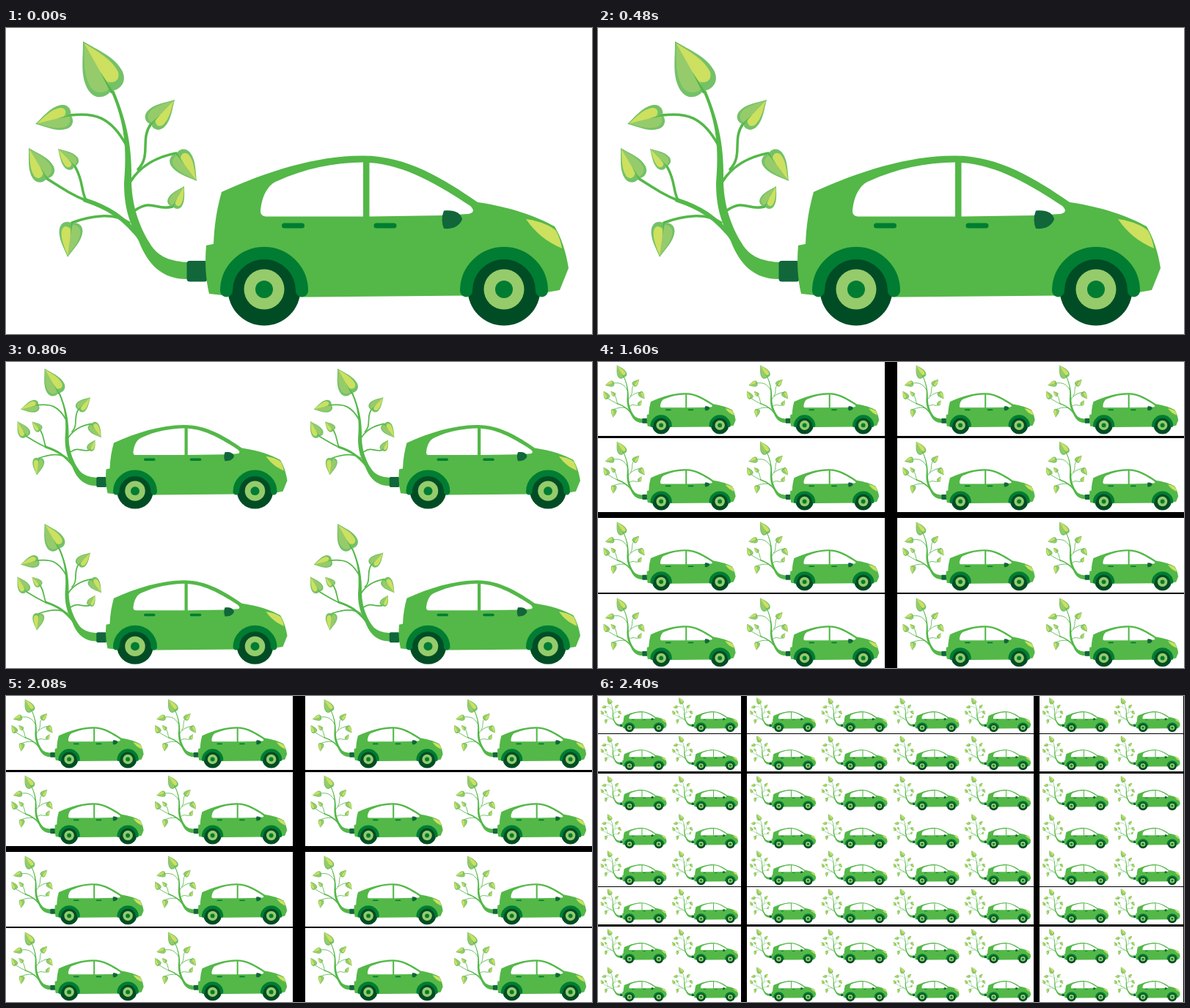
Recreate the animation shown at these times as an HTML page with a canvas. Size 799 px wide and 418 px high, loop 3200 ms.

```html
<!DOCTYPE html>
<html>
<head>
<meta charset="utf-8">
<style>
html, body { margin: 0; width: 100%; height: 100%; overflow: hidden; background: #fff; }
canvas { display: block; }
</style>
</head>
<body>
<canvas id="stage" width="799" height="418"></canvas>
<script>
const W = 799, H = 418, HOLD = 800;
const GREEN = '#53b848', MID = '#007d32', DARK = '#004d25', LIGHT = '#95cb6b', LIME = '#cde05f', PLUG = '#11673a', RIM = '#74c168';
const ctx = document.getElementById('stage').getContext('2d');

const fill = (color, path) => { ctx.fillStyle = color; ctx.fill(new Path2D(path)); };
const disc = (color, x, y, r) => { ctx.fillStyle = color; ctx.beginPath(); ctx.arc(x, y, r, 0, 7); ctx.fill(); };
const pill = (color, x, y, w, h, r) => { ctx.fillStyle = color; ctx.beginPath(); ctx.roundRect(x, y, w, h, r); ctx.fill(); };
const line = (color, width, path) => {
  ctx.strokeStyle = color;
  ctx.lineWidth = width;
  ctx.lineCap = 'round';
  ctx.stroke(new Path2D(path));
};

// A unit leaf laid from its tip to its base; side picks the lime half.
function leaf(tipX, tipY, baseX, baseY, side) {
  const dx = baseX - tipX, dy = baseY - tipY, k = .86 * side;
  ctx.save();
  ctx.transform(dx, dy, -dy * k, dx * k, tipX, tipY);
  fill(RIM, 'M0 0C.28 .18 .5 .4 .78 .39C1 .37 1.05 .14 .98 0C1.05 -.14 1 -.37 .78 -.39C.5 -.4 .28 -.18 0 0');
  fill(LIGHT, 'M.04 0C.3 -.16 .5 -.33 .76 -.32C.93 -.29 .97 -.1 .93 0L.8 .06Z');
  fill(LIME, 'M.04 0C.3 .16 .5 .32 .75 .31C.92 .27 .91 .08 .77 0Z');
  fill(GREEN, 'M.6 0L1.02 -.03L1.02 .03Z');
  ctx.restore();
}

// A twig that runs from a leaf's base along a curve to the stem.
function sprig(tipX, tipY, baseX, baseY, side, curve) {
  line(GREEN, 3.5, `M${baseX} ${baseY}C${curve}`);
  leaf(tipX, tipY, baseX, baseY, side);
}

function plant() {
  fill(GREEN, 'M249 343C215 344 194 325 181 291C168 265 161 245 161 212C165 165 162 130 143 86L147 85C166 130 172 165 171 210C172 250 186 278 196 294C207 313 225 319 249 320Z');
  line(GREEN, 6, 'M108 235C138 245 160 257 186 291');
  leaf(105, 18, 144, 87, -1);
  sprig(40, 131, 89, 119, -1, '120 116 142 120 164 160');
  sprig(230, 98, 197, 132, -1, '183 152 198 175 180 193');
  sprig(260, 209, 232, 171, 1, '210 175 184 186 169 211');
  sprig(243, 216, 227, 244, -1, '204 250 200 233 176 249');
  sprig(31, 164, 56, 206, 1, '78 220 92 229 110 236');
  sprig(71, 165, 94, 189, 1, '106 210 102 222 109 235');
  sprig(84, 313, 90, 266, -1, '114 257 146 251 168 266');
}

function wheel(x) {
  disc(DARK, x, 357, 49.5);
  disc(LIGHT, x, 357, 27.5);
  disc(MID, x, 357, 12);
  line(MID, 17, `M${x - 51.5} 359a51.5 51.5 0 0 1 103 0`);
}

function car() {
  plant();
  pill(PLUG, 246.5, 318, 28, 28.5, 4);
  fill(GREEN, 'M277 363C272 342 271 318 273 297L283 295C284 268 288 245 294 224C355 196 425 174 486 174.5C545 174 597 206 643 238C690 245 722 257 748 271C757 286 764 307 767 328L755 358L738 361L630 365.5L412 367.5L304 366Z');
  fill('#fff', 'M487 183.5V257.5H354Q347 257 347 250C349 229 357 214 370 209C407 192 447 184 487 183.5ZM495.5 184C545 187 592 216 633 243Q642 252 630 254L596 256L495.5 257.5Z');
  for (const x of [376, 501.5]) pill(MID, x, 266.5, 31, 7, 3.5);
  fill(PLUG, 'M597 249.5C611 248 620 252 622 261C619 270 610 275 597 274Q592 262 597 249.5');
  fill(LIME, 'M709 261C730 264 744 271 750 277Q756 288 758 301C737 292 721 279 709 261');
  wheel(352);
  wheel(679);
}

// Every picture is the previous one, shrunk to w by h and repeated two by two.
const grids = [
  { w: 399.5, h: 206.3, stepX: 399.5, stepY: 212.2 },
  { w: 391, h: 205, stepX: 408, stepY: 213.9 },
  { w: 398.6, h: 209, stepX: 399, stepY: 209 }
];

function picture(level, x, y, sx, sy) {
  if (level > 0) {
    const { w, h, stepX, stepY } = grids[level - 1];
    for (const row of [0, 1]) for (const col of [0, 1])
      picture(level - 1, x + col * stepX * sx, y + row * stepY * sy, sx * w / W, sy * h / H);
    return;
  }
  // Whole-pixel cards keep the gaps crisp.
  const left = Math.floor(x), top = Math.floor(y);
  ctx.fillStyle = '#fff';
  ctx.fillRect(left, top, Math.round(x + W * sx) - left, Math.round(y + H * sy) - top);
  ctx.save();
  ctx.translate(x, y);
  ctx.scale(sx, sy);
  car();
  ctx.restore();
}

let shown = -1;
function tick() {
  const level = Math.floor(performance.now() / HOLD) % (grids.length + 1);
  if (level !== shown) {
    shown = level;
    ctx.fillStyle = level > 1 ? '#000' : '#fff';
    ctx.fillRect(0, 0, W, H);
    picture(level, 0, 0, 1, 1);
  }
  requestAnimationFrame(tick);
}
tick();
</script>
</body>
</html>
```
